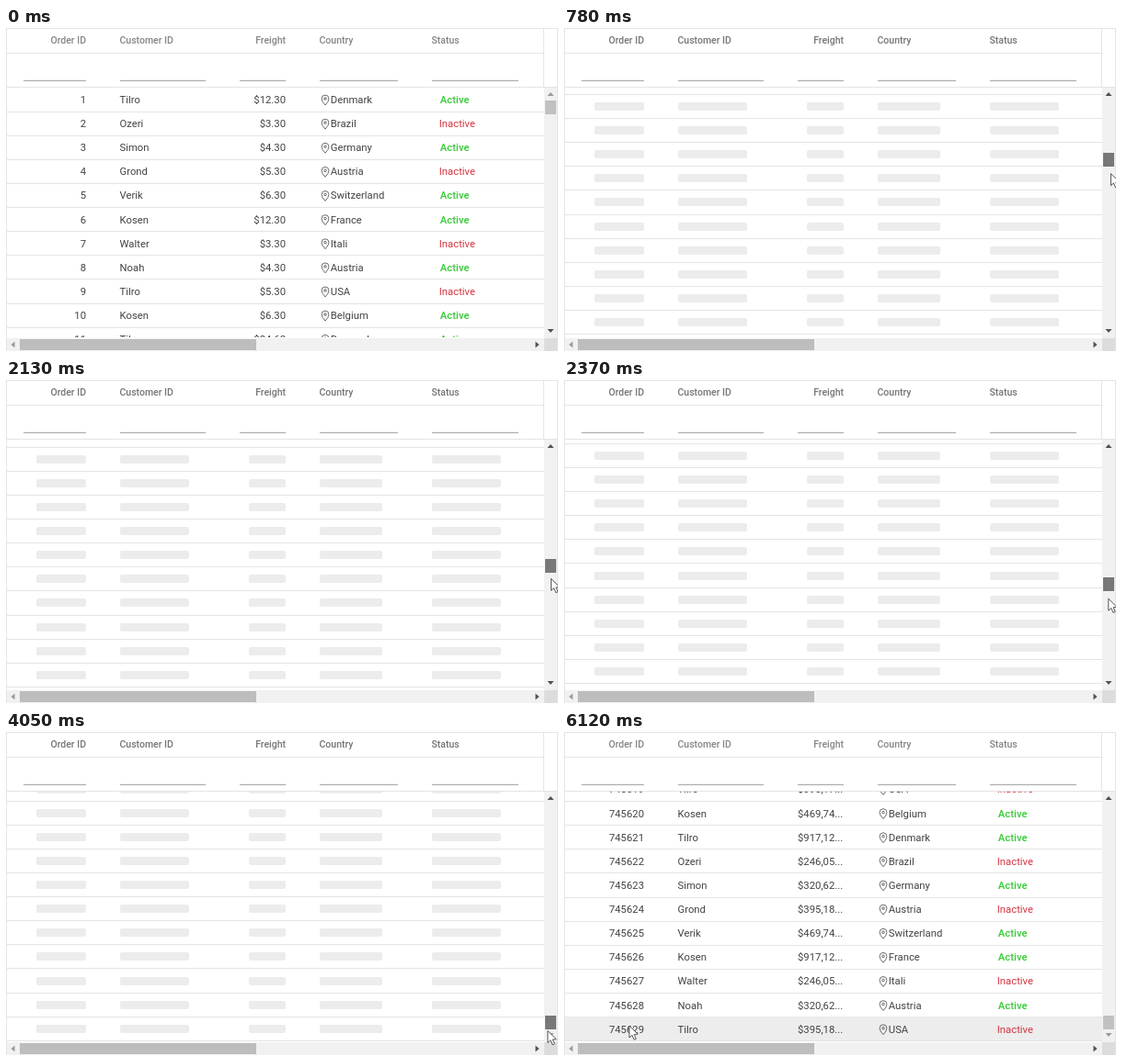
Animation of 600 by 353 pixels, one loop 6150 ms. Source, as an HTML page with a canvas:

```html
<!DOCTYPE html>
<html lang="en">
<head>
<meta charset="utf-8">
<title>Virtual scrolling grid</title>
<style>
  html, body { margin: 0; width: 100%; height: 100%; overflow: hidden; background: #fff; }
  canvas { display: block; }
</style>
</head>
<body>
<canvas id="stage" width="600" height="353"></canvas>
<script>
const ctx = document.getElementById('stage').getContext('2d');
const LOOP = 6150, STEP = 30, PITCH = 26.12;
const TOP = 65, BOTTOM = 337, RIGHT = 585;
const THUMB_MIN = 86.5, THUMB_MAX = 316;
const DRAG_START = 90, LOADED = 5040, EXIT_TIME = 1080;

const names = 'Tilro Ozeri Simon Grond Verik Kosen Walter Noah Tilro Kosen'.split(' ');
const countries = 'Denmark Brazil Germany Austria Switzerland France Itali Austria USA Belgium'.split(' ');
const prices = [12.3, 3.3, 4.3, 5.3, 6.3];

const columns = [
  { title: 'Order ID', left: 19, right: 87, bar: 54, alignRight: true },
  { title: 'Customer ID', left: 124, right: 217, bar: 75 },
  { title: 'Freight', left: 254, right: 304, bar: 40, alignRight: true },
  { title: 'Country', left: 341, right: 426, bar: 68 },
  { title: 'Status', left: 463, right: 557, bar: 75 }
];

// The last drag pulls past the end of the track
const drags = [
  { start: 30, end: 1200, release: 1260, from: THUMB_MIN, to: 176 },
  { start: 1800, end: 2910, release: 2910, from: 176, to: 266 },
  { start: 3600, end: 4110, release: 4380, from: 266, to: 324 }
];

function pose(t) {
  const drag = drags.findLast(d => t >= d.start) || drags[0];
  const p = Math.min(1, Math.max(0, (t - drag.start) / (drag.end - drag.start)));
  const pull = drag.from + (drag.to - drag.from) * p;
  const y = pull + 4 + 12 * Math.sin(Math.PI * p);
  const x = 594.5 - (y - 157) / 30;
  const exit = Math.min(1, Math.max(0, (t - LOADED) / EXIT_TIME));
  return {
    thumb: Math.min(pull, THUMB_MAX),
    pressed: t >= DRAG_START && t >= drag.start && t < drag.release,
    x: x + (71 - x) * exit ** 3,
    y: y + (320 - y) * exit
  };
}

function rect(x, y, w, h, color) {
  ctx.fillStyle = color;
  ctx.fillRect(x, y, w, h);
}

function text(str, x, y, color, right, font = '11.3px') {
  ctx.font = `${font} Roboto, sans-serif`;
  ctx.textAlign = right ? 'right' : 'left';
  ctx.fillStyle = color;
  ctx.fillText(str, x, y);
}

function pin(x, y) {
  const r = 3.9;
  ctx.strokeStyle = '#5c5c5c';
  ctx.lineWidth = 0.9;
  ctx.beginPath();
  ctx.moveTo(x, y + 6);
  ctx.quadraticCurveTo(x - r, y + 2, x - r, y - 1);
  ctx.arc(x, y - 1, r, Math.PI, 0);
  ctx.quadraticCurveTo(x + r, y + 2, x, y + 6);
  ctx.moveTo(x + 1.3, y - 1);
  ctx.arc(x, y - 1, 1.3, 0, 7);
  ctx.stroke();
}

function freight(n) {
  const value = prices[(n - 1) % 5] * Math.ceil(n / 10);
  const str = '$' + value.toLocaleString('en-US', { minimumFractionDigits: 2 });
  return str.length > 7 ? str.slice(0, 7) + '...' : str;
}

function dataRow(n, y) {
  const k = (n - 1) % 10, base = y + 4, ink = '#424242';
  const price = freight(n), cut = price.endsWith('...');
  const inactive = k % 5 % 2;
  text(n, 87, base, ink, true);
  text(names[k], 123.5, base, ink);
  text(price, cut ? 254 : 304, base, ink, !cut);
  pin(347, y);
  text(countries[k], 352.8, base, ink);
  if (inactive) text('Inactive', 470.8, base, '#d4333f');
  else text('Active', 471.8, base, '#35cb35', false, '500 11.3px');
}

function placeholderRow(y) {
  ctx.fillStyle = '#ececec';
  for (const { left, right, bar, alignRight } of columns) {
    ctx.beginPath();
    ctx.roundRect(alignRight ? right - bar : left, Math.round(y - 4.5), bar, 9, 2);
    ctx.fill();
  }
}

function body(t, { thumb, x, y }) {
  const atStart = t < DRAG_START, loaded = atStart || t >= LOADED;
  const order = atStart ? 1 : 745620;
  const sway = 84 - 5 * Math.cos((thumb - 98) / 155 * 2 * Math.PI);
  const first = atStart ? 78 : loaded ? 88.6 : sway;
  ctx.save();
  ctx.beginPath();
  ctx.rect(0, TOP, RIGHT, BOTTOM - TOP);
  ctx.clip();
  for (let i = -1; i < 11; i++) {
    const rowY = first + i * PITCH;
    const hovered = t >= LOADED && x < RIGHT && Math.abs(y - rowY) < PITCH / 2;
    if (hovered) rect(0, rowY - PITCH / 2, RIGHT, PITCH, '#ededed');
    rect(0, Math.round(rowY + 12.6), RIGHT, 1, '#e4e4e4');
    if (!loaded) placeholderRow(rowY);
    else if (order + i > 0) dataRow(order + i, rowY);
  }
  ctx.restore();
  return loaded;
}

function header(loaded) {
  const line = '#e4e4e4';
  for (const [y, w] of [[0, 600], [27, RIGHT], [64, 600]]) rect(0, y, w, 1, line);
  rect(0, 0, 1, 352, line);
  rect(RIGHT - 1, 0, 1, TOP, line);
  rect(599, 0, 1, 352, line);
  for (const { title, left, right, alignRight } of columns) {
    text(title, alignRight ? right : left - 0.5, 17.2, loaded ? '#858585' : '#757575', alignRight, '500 10.5px');
    rect(left, 57, right - left, 1, '#a6a6a6');
  }
}

function triangle(x, y, turns, color) {
  ctx.save();
  ctx.translate(x, y);
  ctx.rotate(turns * Math.PI / 2);
  ctx.beginPath();
  ctx.moveTo(-3.5, 2);
  ctx.lineTo(3.5, 2);
  ctx.lineTo(0, -2);
  ctx.fillStyle = color;
  ctx.fill();
  ctx.restore();
}

function scrollbars(t, { thumb, pressed }) {
  const dark = '#505050', pale = '#9a9a9a', track = '#f1f1f1';
  const hovered = t >= 60 && t < LOADED + 300;
  rect(RIGHT, TOP, 14, BOTTOM + 1 - TOP, track);
  rect(1, 338, RIGHT - 1, 14, track);
  rect(RIGHT, 338, 14, 14, '#dcdcdc');
  rect(586, Math.round(thumb - 7.5), 12, 15, pressed ? '#787878' : hovered ? '#a3a3a3' : '#c1c1c1');
  rect(15, 339, 257, 12, '#bdbdbd');
  triangle(592, 72, 0, thumb <= THUMB_MIN ? pale : dark);
  triangle(577.5, 345, 1, dark);
  triangle(592, 330, 2, thumb >= THUMB_MAX ? pale : dark);
  triangle(7.5, 345, 3, pale);
}

function pointer({ x, y }) {
  ctx.save();
  ctx.translate(x, y);
  const shape = new Path2D('M0 0V13L3 10.3 5.2 15.3 7.4 14.3 5.3 9.5 9.3 9.2Z');
  ctx.fillStyle = '#fff';
  ctx.fill(shape);
  ctx.strokeStyle = '#444';
  ctx.lineWidth = 0.9;
  ctx.stroke(shape);
  ctx.restore();
}

function draw(now) {
  const t = Math.floor(now % LOOP / STEP) * STEP;
  const state = pose(t);
  rect(0, 0, 600, 353, '#fff');
  header(body(t, state));
  scrollbars(t, state);
  if (t > 0) pointer(state);
  requestAnimationFrame(draw);
}
requestAnimationFrame(draw);
</script>
</body>
</html>
```
